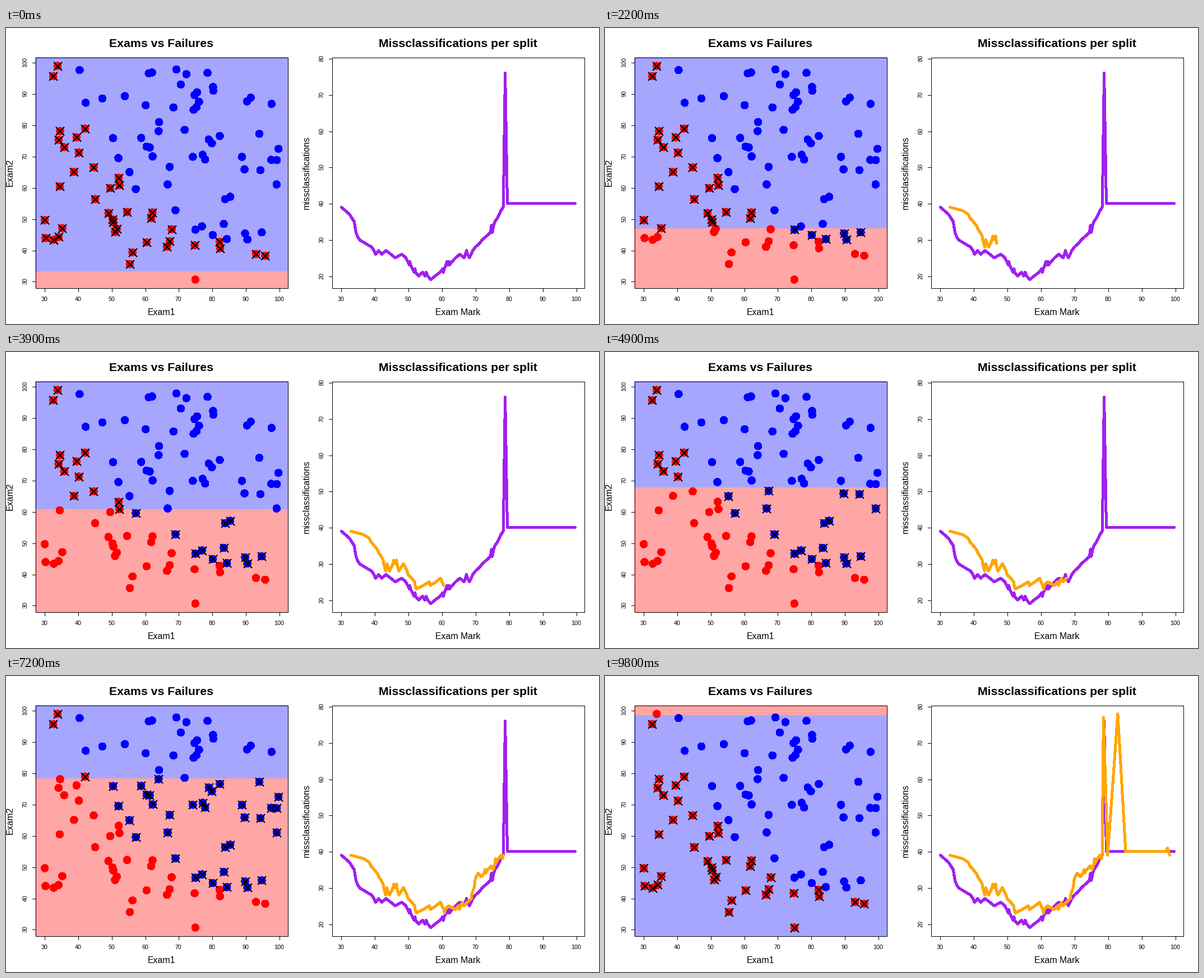
Animation, 1058 px wide and 529 px high, one loop 9.9 s. Source, as a matplotlib script:

```python
import numpy as np
import matplotlib.pyplot as plt
from matplotlib.animation import FuncAnimation
from matplotlib.patches import Rectangle

W, H, DPI = 1058, 529, 64
PT = 72 / DPI  # points per pixel
TOP, BOTTOM, WIDTH = 51.96, 464.37, 450.4

plt.rcParams["font.family"] = "Liberation Sans"

# (exam 1, exam 2) marks
failed = [
    (34.62, 78.02), (30.29, 43.89), (35.85, 72.90), (45.08, 56.32), (95.86, 38.23),
    (75.01, 30.60), (39.54, 76.04), (67.95, 46.68), (67.37, 42.84), (50.53, 48.86),
    (34.21, 44.21), (93.11, 38.80), (61.83, 50.26), (38.79, 65.00), (52.11, 63.13),
    (40.24, 71.17), (54.64, 52.21), (33.92, 98.87), (74.79, 41.57), (34.18, 75.24),
    (51.55, 46.86), (82.37, 40.62), (51.05, 45.82), (62.22, 52.06), (34.52, 60.40),
    (50.29, 49.80), (49.59, 59.81), (32.58, 95.60), (35.29, 47.02), (56.25, 39.26),
    (30.06, 49.59), (44.67, 66.45), (66.56, 41.09), (49.07, 51.88), (32.72, 43.31),
    (60.456, 42.51), (82.23, 42.72), (42.08, 78.84), (52.35, 60.77), (55.48, 35.57),
]
passed = [
    (60.18, 86.31), (79.03, 75.34), (61.11, 96.51), (75.02, 46.55), (76.10, 87.42),
    (84.43, 43.53), (82.31, 76.48), (69.36, 97.72), (53.97, 89.21), (69.07, 52.74),
    (70.66, 92.93), (76.98, 47.58), (89.68, 65.80), (77.92, 68.97), (62.27, 69.95),
    (80.19, 44.82), (61.38, 72.81), (85.40, 57.05), (52.05, 69.43), (64.18, 80.91),
    (83.90, 56.31), (94.44, 65.57), (77.19, 70.46), (97.77, 86.73), (62.07, 96.77),
    (91.56, 88.70), (79.94, 74.16), (99.27, 60.999), (90.55, 43.39), (97.65, 68.86),
    (74.25, 69.82), (71.80, 78.45), (75.40, 85.76), (40.46, 97.54), (80.28, 92.12),
    (66.75, 60.991), (64.04, 78.03), (72.35, 96.23), (60.458, 73.09), (58.84, 75.86),
    (99.83, 72.37), (47.26, 88.48), (50.46, 75.81), (88.91, 69.80), (94.83, 45.69),
    (67.32, 66.59), (57.24, 59.51), (80.37, 90.96), (68.47, 85.59), (75.48, 90.42),
    (78.64, 96.65), (94.09, 77.16), (90.45, 87.51), (74.49, 84.85), (89.85, 45.36),
    (83.49, 48.38), (42.26, 87.10), (99.32, 68.78), (55.34, 64.93), (74.78, 89.53),
]
marks = np.array(failed + passed)
label = np.repeat([0, 1], [len(failed), len(passed)])
exam1, exam2 = marks.T


def splits(values):
    v = np.sort(values)
    return (v[1:] + v[:-1]) / 2


def classify(values, cut):
    """Majority class on each side of the cut (0.5 for a tie) and the misses."""
    low = values < cut
    below, above = np.median(label[low]), np.median(label[~low])
    return below, above, label != np.where(low, below, above)


def miss_counts(values):
    return np.array([classify(values, c)[2].sum() for c in splits(values)])


cuts1, cuts2 = splits(exam1), splits(exam2)
miss1, miss2 = miss_counts(exam1), miss_counts(exam2)

fig = plt.figure(figsize=(W / DPI, H / DPI), dpi=DPI, facecolor="white")
ax = fig.add_axes([0, 0, 1, 1])
ax.set(xlim=(0, W), ylim=(H, 0))
ax.axis("off")


def text(x, y, s, size, **kw):
    ax.text(x, y, s, fontsize=size * PT, ha="center", va="baseline",
            rotation_mode="anchor", **kw)


def stroke(x, y, color="black", width=1, **kw):
    return ax.plot(x, y, color=color, lw=width * PT, antialiased=False,
                   solid_joinstyle="round", **kw)[0]


class Panel:
    def __init__(self, left, xs, ys):
        self.left = left
        self.x0, self.kx = self.scale(xs, WIDTH)
        self.y0, self.ky = self.scale(ys, BOTTOM - TOP)

    @staticmethod
    def scale(values, length):
        lo, hi = np.min(values), np.max(values)
        pad = 0.04 * (hi - lo)
        return lo - pad, length / (hi - lo + 2 * pad)

    def x(self, v):
        return self.left + (v - self.x0) * self.kx + 0.5

    def y(self, v):
        return BOTTOM - (v - self.y0) * self.ky + 0.5

    def frame(self, title, xlab, ylab, xticks, yticks):
        l, r = np.floor(self.left + 0.5) + 0.5, np.floor(self.left + WIDTH) + 0.5
        t, b = 52.5, 464.5
        stroke([l, r, r, l, l], [t, t, b, b, t], zorder=1)
        for v in xticks:
            p = np.floor(self.x(v)) + 0.5
            stroke([p, p], [b, b + 6], zorder=1)
            text(p, 488, str(v), 10.8)
        for v in yticks:
            p = np.floor(self.y(v)) + 0.5
            stroke([l - 6, l], [p, p], zorder=1)
            text(l - 15, p, str(v), 10.8, rotation=90)
        mid = (l + r) / 2
        text(mid, 34.5, title, 21.2, weight="bold")
        text(mid, 513, xlab, 15.84)
        text(l - 41, (t + b) / 2, ylab, 15.84, rotation=90)


left = Panel(51.96, exam1, exam2)
right = Panel(580.96, cuts1, np.append(miss1, miss2))
tens = range(30, 101, 10)
left.frame("Exams vs Failures", "Exam1", "Exam2", tens, tens)
right.frame("Missclassifications per split", "Exam Mark", "missclassifications",
            tens, range(20, 81, 10))

upper, lower = (ax.add_patch(Rectangle((52, 52), 451, 413, alpha=0.35, lw=0, zorder=2))
                for _ in range(2))
px, py = left.x(exam1), left.y(exam2)
ax.scatter(px, py, s=(13.6 * PT) ** 2, c=np.where(label, "blue", "red"),
           linewidths=0, antialiaseds=False, zorder=3)
crosses = ax.plot([], [], "x", color="black", ms=15 * PT, mew=2.2 * PT,
                  antialiased=False, zorder=4)[0]

stroke(right.x(cuts1), right.y(miss1), "#A020F0", 4, solid_capstyle="round", zorder=3)
trace = stroke([], [], "#FFA500", 4, solid_capstyle="round", zorder=4)


def fill(rect, top, bottom, vote):
    rect.set_bounds(52, top, 451, bottom - top)
    rect.set_facecolor("blue" if vote == 1 else "red")


def update(i):
    below, above, missed = classify(exam2, cuts2[i])
    edge = np.floor(left.y(cuts2[i]))
    fill(upper, 52, edge, above)
    fill(lower, edge, 465, below)
    crosses.set_data(px[missed], py[missed])
    trace.set_data(right.x(cuts2[:i + 1]), right.y(miss2[:i + 1]))
    return upper, lower, crosses, trace


anim = FuncAnimation(fig, update, frames=len(cuts2), interval=100,
                     repeat=True, repeat_delay=0, blit=False)
plt.show()
```
